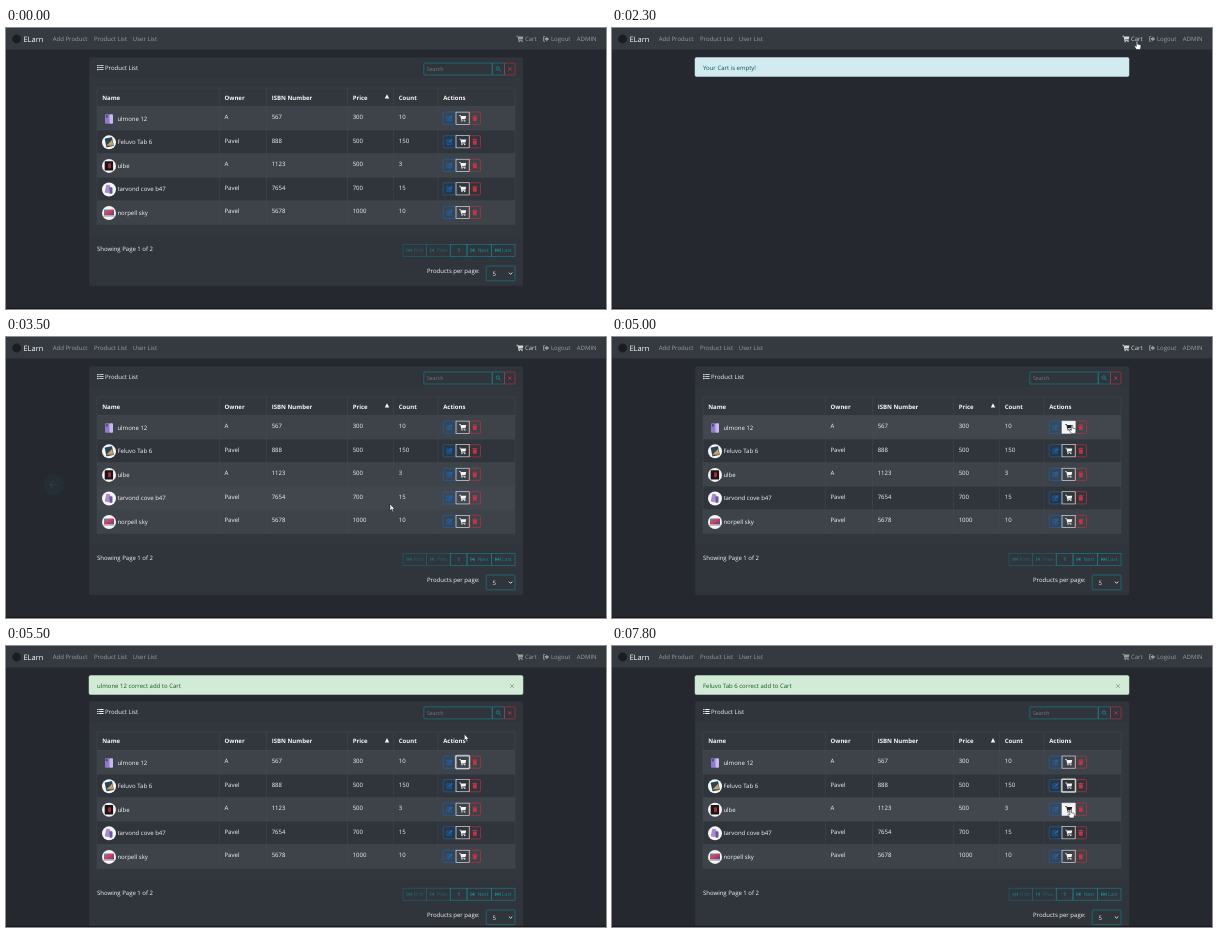
These frames come from a looping animation (600x281 px, 8 s). An HTML page:

```html
<!DOCTYPE html>
<html lang="en">
<head>
<meta charset="utf-8">
<title>Shop admin</title>
<style>
  html, body { margin: 0; width: 100%; height: 100%; overflow: hidden; background: #25282e; }
  svg { display: block; width: 600px; height: 281px; }
  text { font: 6px "Open Sans", "Noto Sans", sans-serif; fill: #f4f5f6; text-rendering: geometricPrecision; white-space: pre; }
  .bold { font-weight: 700; }
  .small { font-size: 5.2px; }
  .nav text, .nav use { fill: #9a9da0; color: #9a9da0; }
  .nav .brand { font-size: 7.5px; fill: #fff; }
  .nav .lit text, .nav .lit use { fill: #d6d8d9; color: #d6d8d9; }
</style>
</head>
<body>
<svg viewBox="0 0 600 281" xmlns="http://www.w3.org/2000/svg">
  <defs>
    <g id="cart" fill="currentColor">
      <path d="M0 0h1.5l.3.9h5.2l-.7 3H2.6l.2.7h3.4v.6H2.2L1.1.7H0z"/>
      <circle cx="2.8" cy="5.8" r=".7"/><circle cx="5.6" cy="5.8" r=".7"/>
    </g>
    <g id="logout" fill="none" stroke="currentColor" stroke-width=".8">
      <path d="M2.2.5H.5v4.6h1.7"/>
      <path d="M1.7 1.9h1.6V.3l2.9 2.5-2.9 2.5V3.7H1.7z" fill="currentColor" stroke="none"/>
    </g>
    <g id="list" fill="currentColor">
      <path d="M0 0h1.3v1.2H0zM0 2h1.3v1.2H0zM0 4h1.3v1.2H0zM2 .2h4.4v.8H2zM2 2.2h4.4v.8H2zM2 4.2h4.4v.8H2z"/>
    </g>
    <g id="edit">
      <path d="M3.6 1.1H.5v4.4h4.4V3.5" fill="none" stroke="currentColor" stroke-width=".8"/>
      <path d="M1.9 4.4l.2-1.5L5 0l1.3 1.3-2.9 2.9z" fill="currentColor"/>
    </g>
    <g id="trash" fill="currentColor">
      <path d="M0 .5h1.4L1.7 0h1.6l.3.5H5v.7H0zM.4 1.6h4.2l-.3 4.2H.7z"/>
    </g>
    <g id="find" fill="none" stroke="currentColor" stroke-width=".9">
      <circle cx="2.1" cy="2.1" r="1.6"/><path d="M3.3 3.3l1.9 1.9"/>
    </g>
    <g id="ends" fill="currentColor"><path d="M0 0h.8v4H0zM3.2 0v4L.9 2zM5.6 0v4L3.3 2z"/></g>
    <g id="step" fill="currentColor"><path d="M0 0h.9v4H0zM4 0v4L1 2z"/></g>
    <path id="arrow" d="M0 0v6.6l1.5-1.3 1.1 2.4 1.1-.5-1-2.3h2z"
      fill="#fff" stroke="#111" stroke-width=".5"/>
    <path id="hand" d="M-.7.5q.7-.9 1.4 0v2.7l2.6.6q.8.3.7 1.1l-.6 3.6H-.6L-2.5 5.6q-.3-.9.5-1l1.3.8z"
      fill="#fff" stroke="#111" stroke-width=".5"/>
    <linearGradient id="wall" x2="1" y2="1">
      <stop stop-color="#3a9be0"/><stop offset=".45" stop-color="#d9404f"/><stop offset="1" stop-color="#3547a8"/>
    </linearGradient>
  </defs>
  <g id="page"></g>
</svg>
<script>
const NS = 'http://www.w3.org/2000/svg';
const TEAL = '#148394', TEAL_DIM = '#1d626e', BLUE = '#0a67cd', RED = '#c53242', WHITE = '#f4f5f6';
const CARD = '#32373d', LINE = '#434a51', STRIPE = '#3e4349', SHIFT = 25.9;
const ROW_TOP = 78.6, ROW_H = 23.55;

const add = (parent, tag, attrs = {}, content) => {
  const el = document.createElementNS(NS, tag);
  for (const key in attrs) el.setAttribute(key, attrs[key]);
  if (content !== undefined) el.textContent = content;
  parent.append(el);
  return el;
};
const group = (parent, attrs) => add(parent, 'g', attrs);
const rect = (parent, x, y, width, height, fill, more) =>
  add(parent, 'rect', { x, y, width, height, fill, ...more });
const text = (parent, x, y, str, more) => add(parent, 'text', { x, y, ...more }, str);
const icon = (parent, name, x, y, color, scale = 1) =>
  add(parent, 'use', { href: '#' + name, transform: `translate(${x} ${y}) scale(${scale})`, color });
const box = (parent, x, y, w, h, stroke, more) =>
  rect(parent, x, y, w, h, 'none', { stroke, 'stroke-width': .6, ...more });
const path = (parent, d, stroke, width = .6) =>
  add(parent, 'path', { d, stroke, 'stroke-width': width, fill: 'none' });
const show = (el, on) => el.setAttribute('visibility', on ? 'visible' : 'hidden');

const root = document.getElementById('page');
rect(root, 0, 0, 600, 281, '#25282e');

// Product card
const card = group(root);
rect(card, 83, 29.3, 434.3, 228.7, CARD, { rx: 1.5, stroke: '#2a2e33', 'stroke-width': .5 });
rect(card, 83, 29.3, 434.3, 21, '#000', { opacity: .03 });
rect(card, 83, 207, 434.3, 51, '#000', { opacity: .03 });
icon(card, 'list', 91.2, 37, WHITE);
text(card, 99, 42, 'Product List');
box(card, 417.8, 35, 68.4, 12, TEAL, { rx: 1 });
text(card, 421, 42.8, 'Search', { class: 'small', style: 'fill:#757b81' });
box(card, 486.2, 35, 12.3, 12, TEAL);
icon(card, 'find', 489.7, 38.3, TEAL);
box(card, 498.5, 35, 10.5, 12, RED, { rx: 1 });
path(card, 'M502.2 39.5l3.2 3.2m0-3.2l-3.2 3.2', RED, .9);

// Table
const cols = [91, 213.3, 260.5, 341.5, 387.6, 432, 509];
const rows = [
  ['ulmone 12', 'A', '567', '300', '10'],
  ['Feluvo Tab 6', 'Pavel', '888', '500', '150'],
  ['ulbe', 'A', '1123', '500', '3'],
  ['tarvond cove b47', 'Pavel', '7654', '700', '15'],
  ['norpell sky', 'Pavel', '5678', '1000', '10']
];
const thumbs = [
  g => { rect(g, -4, -4.5, 5, 9.5, '#8f7cc9', { rx: 1 }); rect(g, .5, -4.5, 3.5, 9.5, '#c9b8ec', { rx: 1 });
         rect(g, -3.2, -3.7, 2, 2.6, '#55448c', { rx: .6 }); },
  g => { rect(g, -3.5, -4.5, 7.5, 9, '#27455a', { rx: .6, transform: 'rotate(-12)' });
         add(g, 'path', { d: 'M-2.6 3.3L3.2-2.5l1 5.6z', fill: '#d2a05c' }); },
  g => { rect(g, -4.3, -4.7, 8.4, 9.3, '#1d1418', { rx: .6 }); rect(g, -1, -2.6, 3, 5, '#a52d38', { rx: 1.2 }); },
  g => { rect(g, -3.6, -4.2, 4.2, 8, '#a98bd2', { rx: .8, transform: 'rotate(12)' });
         rect(g, .3, -2.2, 3.2, 6.5, '#6a5a92', { rx: .8 }); },
  g => { rect(g, -5, -3.4, 10, 6, 'url(#wall)', { rx: .5 }); rect(g, -6, 2.8, 12, 1, '#a9adb3', { rx: .5 }); }
];
const bands = [], carts = [];

['Name', 'Owner', 'ISBN Number', 'Price', 'Count', 'Actions'].forEach((name, i) =>
  text(card, cols[i] + 5.2, 71.6, name, { class: 'bold' }));
add(card, 'path', { d: 'M378.8 70.6l2.2-4.4 2.2 4.4z', fill: WHITE });

rows.forEach((cells, i) => {
  const top = ROW_TOP + i * ROW_H;
  bands.push(rect(card, 91, top, 418, ROW_H, 'none'));
  const thumb = group(card, { transform: `translate(103 ${top + 12.2})` });
  if (i) add(thumb, 'circle', { r: 7, fill: '#f5f5f6' });
  thumbs[i](thumb);
  cells.forEach((str, c) =>
    text(card, c ? cols[c] + 5.2 : 111.4, top + (c ? 12.6 : 14.2), str));

  const y = top + 5.5;
  box(card, 437.2, y, 12.8, 12.2, BLUE, { rx: 1 });
  icon(card, 'edit', 440.4, y + 3.2, BLUE);
  box(card, 463.2, y, 11.3, 12.2, RED, { rx: 1 });
  icon(card, 'trash', 466.3, y + 3.2, RED);
  const ring = box(card, 449.6, y - .5, 14, 13.2, '#a3a6a9', { 'stroke-width': 1.5, rx: 1 });
  const face = box(card, 450, y, 13.2, 12.2, WHITE);
  carts.push({ ring, face, glyph: icon(card, 'cart', 453.2, y + 3, WHITE) });
});
const bottom = ROW_TOP + rows.length * ROW_H;
path(card, cols.map(x => `M${x} 60V${bottom}`).join(''), LINE, .5);
path(card, `M91 60H509M91 ${ROW_TOP}H509M91 ${bottom}H509` +
  rows.map((_, i) => `M91 ${ROW_TOP + i * ROW_H}H509`).join(''), LINE, .5);

// Pager
text(card, 91, 223, 'Showing Page 1 of 2');
const pager = (x, w, glyph, label, color, flip) => {
  box(card, x, 216.3, w, 12, color);
  const use = icon(card, glyph, x + 3.5, 220.3, color);
  if (flip) use.setAttribute('transform', `translate(${x + 9.1} 220.3) scale(-1 1)`);
  text(card, x + 10.4, 224.2, label, { class: 'small', style: `fill:${color}` });
};
pager(397, 23.5, 'ends', 'First', TEAL_DIM);
pager(420.5, 23.7, 'step', 'Prev', TEAL_DIM);
pager(461, 24.5, 'step', 'Next', TEAL);
pager(485.5, 23.5, 'ends', 'Last', TEAL, true);
box(card, 444.2, 216.3, 16.8, 12, TEAL);
text(card, 451.2, 224.2, '1', { class: 'small bold', style: `fill:${TEAL}` });
text(card, 421, 245, 'Products per page:');
box(card, 480.2, 238, 28.8, 14.8, TEAL, { rx: 1 });
text(card, 486.6, 247.7, '5');
path(card, 'M502.9 244.6l1.7 1.7 1.7-1.7', WHITE, .9);

// Alert
const alertBox = group(root);
const alertBg = rect(alertBox, 83, 29.5, 434, 19, '', { rx: 1.5, 'stroke-width': .5 });
const alertText = text(alertBox, 91, 42, '');
const alertClose = path(alertBox, 'M504.2 38.2l3.6 3.6m0-3.6l-3.6 3.6', '#7d8d82', .7);

// Navbar
const nav = group(root, { class: 'nav' });
rect(nav, 0, 0, 600, 21.5, '#343a40');
add(nav, 'circle', { cx: 10.6, cy: 11, r: 4.4, fill: '#1b1d20' });
text(nav, 17.4, 13.6, 'ELarn', { class: 'brand' });
[[46.8, 'Add Product'], [88, 'Product List'], [126.8, 'User List'], [545, 'Logout'], [570.8, 'ADMIN']]
  .forEach(([x, str]) => text(nav, x, 13, str));
icon(nav, 'logout', 537, 8.1);
const cartLink = group(nav);
icon(cartLink, 'cart', 510.4, 7.7);
text(cartLink, 519, 13, 'Cart');

rect(root, 0, 279.9, 600, 1.1, '#17191d');

// Back-swipe bubble
const swipe = group(root, { transform: 'translate(48 148)' });
add(swipe, 'circle', { r: 10.5, fill: '#1f7a94' });
path(swipe, 'M4 0H-4M-.6-3.6L-4.2 0l3.6 3.6', '#fff', 1.2);

const cursor = add(root, 'use');

const notes = {
  empty: { str: 'Your Cart is empty!', bg: '#d1ebf0', edge: '#bee5eb', ink: '#0c5460' },
  first: { str: rows[0][0] + ' correct add to Cart' },
  second: { str: rows[1][0] + ' correct add to Cart' }
};
const green = { bg: '#d2ebd7', edge: '#c3e6cb', ink: '#155724' };

// at: ms; pos: pointer tip; over/focus: row index of the cart button
const steps = [
  { at: 0 },
  { at: 800, pos: [525, 228] },
  { at: 1000, pos: [526, 200] },
  { at: 1300, pos: [527, 168] },
  { at: 1500, pos: [526, 135] },
  { at: 1800, pos: [525, 42] },
  { at: 2000, pos: [525, 13], hand: 1, lit: 1 },
  { at: 2300, pos: [525, 13], hand: 1, lit: 1, note: 'empty' },
  { at: 2800, pos: [448, 96], lit: 1, note: 'empty' },
  { at: 3000, pos: [384, 167], lit: 1, note: 'empty' },
  { at: 3300, pos: [384, 167], lit: 1, note: 'empty', swipe: .6 },
  { at: 3500, pos: [384, 167], lit: 1, swipe: .07 },
  { at: 3800, pos: [408, 162], lit: 1 },
  { at: 4000, pos: [436, 155], lit: 1 },
  { at: 4300, pos: [455, 112], lit: 1 },
  { at: 4500, pos: [460, 88], lit: 1, hand: 1, over: 0 },
  { at: 5300, pos: [458.3, 88], note: 'first', focus: 0 },
  { at: 5800, pos: [458.5, 108], note: 'first', focus: 0 },
  { at: 6000, pos: [458, 132], note: 'first', focus: 0 },
  { at: 6300, pos: [458, 137], note: 'first', focus: 0, hand: 1, over: 1 },
  { at: 6800, pos: [458, 137], note: 'second', focus: 1, hand: 1, over: 1 },
  { at: 7300, pos: [458, 153], note: 'second', focus: 1 },
  { at: 7500, pos: [458.5, 163.5], note: 'second', focus: 1, hand: 1, over: 2 }
];

function draw({ pos, hand, lit, note, over, focus, swipe: fade = 0 }) {
  const shift = note ? SHIFT : 0;
  const msg = { ...green, ...notes[note] };
  card.setAttribute('transform', `translate(0 ${shift})`);
  card.setAttribute('display', note === 'empty' ? 'none' : 'inline');
  alertBox.setAttribute('display', note ? 'inline' : 'none');
  alertBg.setAttribute('fill', msg.bg);
  alertBg.setAttribute('stroke', msg.edge);
  alertText.textContent = msg.str || '';
  alertText.style.fill = msg.ink;
  alertClose.setAttribute('display', note === 'empty' ? 'none' : 'inline');

  const inTable = pos && pos[0] > 91 && pos[0] < 509;
  const hovered = inTable ? Math.floor((pos[1] - shift - ROW_TOP) / ROW_H) : -1;
  bands.forEach((band, i) =>
    band.setAttribute('fill', i === hovered ? '#42474d' : i % 2 ? '#30353b' : STRIPE));
  carts.forEach(({ ring, face, glyph }, i) => {
    ring.setAttribute('display', i === focus ? 'inline' : 'none');
    face.setAttribute('fill', i === over ? WHITE : 'none');
    glyph.setAttribute('color', i === over ? '#212529' : WHITE);
  });

  cartLink.setAttribute('class', lit ? 'lit' : '');
  swipe.setAttribute('opacity', fade);
  show(cursor, pos);
  if (pos) {
    cursor.setAttribute('href', hand ? '#hand' : '#arrow');
    cursor.setAttribute('transform', `translate(${pos})`);
  }
}

const start = performance.now();
let current;
function tick(now) {
  const t = Math.max(0, now - start) % 8000;
  const step = steps.findLast(s => s.at <= t);
  if (step !== current) draw(current = step);
  requestAnimationFrame(tick);
}
tick(start);
</script>
</body>
</html>
```
